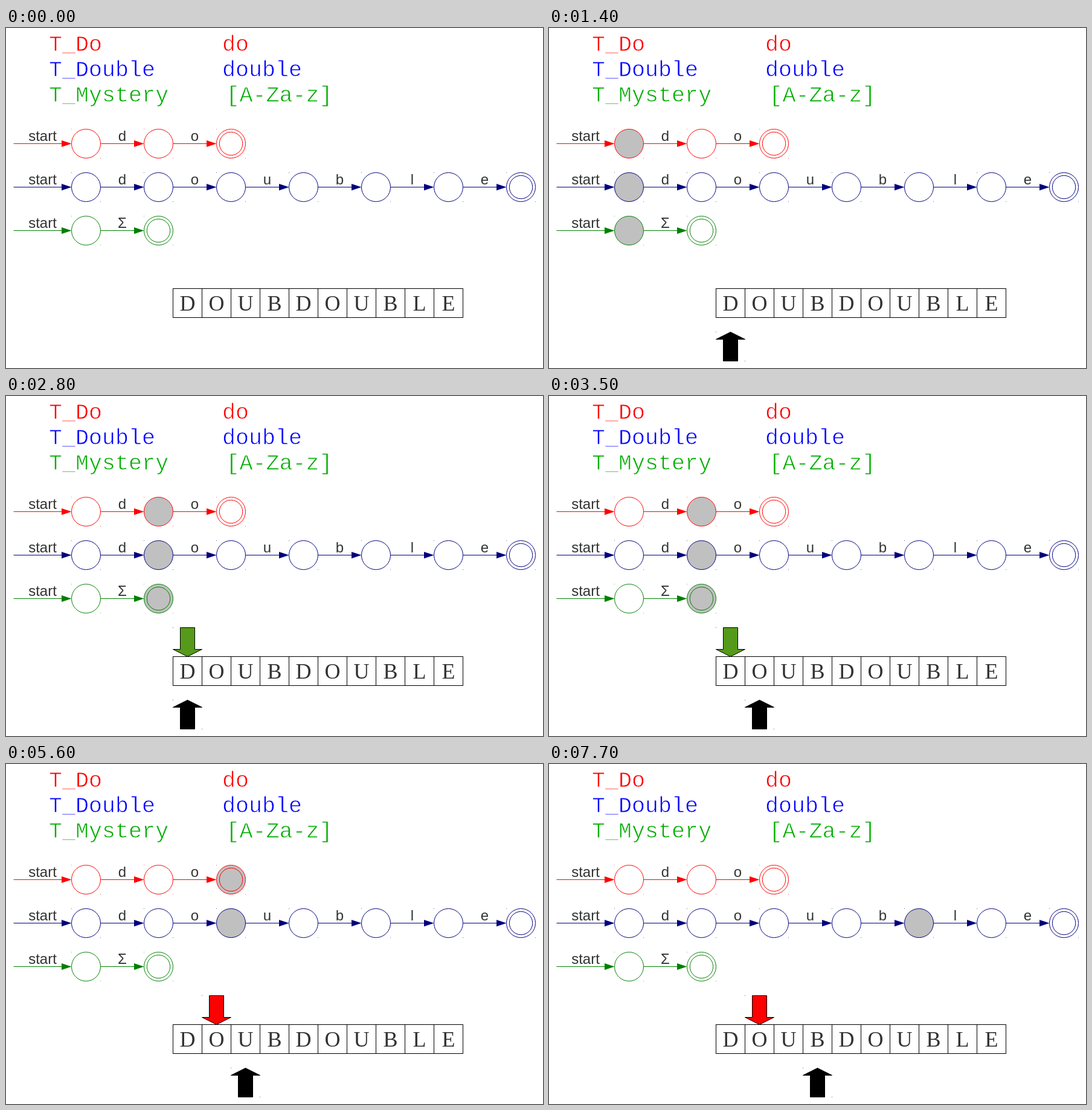
These frames come from a looping animation (889 by 563 pixels, 8 s). An HTML page:

```html
<!DOCTYPE html>
<html lang="en">
<head>
<meta charset="utf-8">
<title>Maximal munch scanning</title>
<style>
  html, body { margin: 0; width: 100%; height: 100%; overflow: hidden; background: #fff; }
  svg { display: block; width: 889px; height: 563px; }
  .rule { font: 36.7px "Courier New", "Liberation Mono", monospace; white-space: pre; stroke: #fff; stroke-width: .8px; }
  .label { font: 24px "Liberation Sans", Arial, sans-serif; fill: #333; text-anchor: middle; }
  .cell { font: 36px "Liberation Serif", "Times New Roman", serif; fill: #333; text-anchor: middle; }
  .token { fill: #c0c0c0; stroke: none; }
  .token, #head, #mark { animation: 8s step-end infinite; }
  #red { animation-name: red; }
  #blue { animation-name: blue; }
  #green { animation-name: green; }
  #head { animation-name: head; }
  #mark { animation-name: mark; }

  /* one step lasts 700 ms = 8.75% */
  @keyframes red {
    0% { opacity: 0; transform: none; }
    8.75% { opacity: 1; transform: none; }
    26.25% { opacity: 1; transform: translateX(120px); }
    52.5% { opacity: 1; transform: translateX(240px); }
    78.75%, 100% { opacity: 0; transform: none; }
  }
  @keyframes blue {
    0% { opacity: 0; transform: none; }
    8.75% { opacity: 1; transform: none; }
    26.25% { opacity: 1; transform: translateX(120px); }
    52.5% { opacity: 1; transform: translateX(240px); }
    78.75% { opacity: 1; transform: translateX(360px); }
    96.25%, 100% { opacity: 1; transform: translateX(480px); }
  }
  @keyframes green {
    0% { opacity: 0; transform: none; }
    8.75% { opacity: 1; transform: none; }
    26.25% { opacity: 1; transform: translateX(120px); }
    52.5%, 100% { opacity: 0; transform: none; }
  }
  @keyframes head {
    0% { opacity: 0; transform: none; }
    17.5% { opacity: 1; transform: none; }
    43.75% { opacity: 1; transform: translateX(48px); }
    70% { opacity: 1; transform: translateX(96px); }
    87.5%, 100% { opacity: 1; transform: translateX(144px); }
  }
  @keyframes mark {
    0% { opacity: 0; transform: none; fill: #559a1a; }
    35% { opacity: 1; transform: none; fill: #559a1a; }
    52.5% { opacity: 1; transform: none; fill: #00ae00; }
    61.25%, 100% { opacity: 1; transform: translateX(48px); fill: #f00; }
  }
</style>
</head>
<body>
<svg id="stage" viewBox="0 0 889 563" fill="none"></svg>
<script>
  const stage = document.getElementById('stage');

  function add(parent, tag, attrs, text) {
    const el = document.createElementNS('http://www.w3.org/2000/svg', tag);
    for (const key in attrs) el.setAttribute(key, attrs[key]);
    if (text) el.textContent = text;
    parent.append(el);
    return el;
  }

  // specks at the corners of a shape's 48px box
  function corners(parent, x, y, color) {
    for (const d of [0, 48])
      add(parent, 'rect', { x: x + d - .5, y: y + d - .5, width: 1, height: 1, fill: color, stroke: 'none', opacity: .6 });
  }

  function rule(name, pattern, x, y, fill) {
    add(stage, 'text', { class: 'rule', x: 71, y, fill }, name);
    add(stage, 'text', { class: 'rule', x, y, fill }, pattern);
  }

  function edge(row, from, to, y, color, label) {
    add(row, 'path', { d: `M${from} ${y}H${to - 14}` });
    add(row, 'path', { d: `M${to} ${y}l-16.5 -5.5v11z`, fill: color, stroke: 'none' });
    return add(row, 'text', { class: 'label', x: (from + to) / 2, y: y - 4.5, stroke: 'none' }, label);
  }

  function machine(id, letters, y, color) {
    const row = add(stage, 'g', { stroke: color });
    add(row, 'circle', { id, class: 'token', cx: 132.5, cy: y, r: 24 });
    edge(row, 12.5, 108.5, y, color, 'start');
    for (let i = 0; i <= letters.length; i++) {
      const cx = 132.5 + 120 * i;
      corners(row, cx - 24, y - 24, color);
      add(row, 'circle', { cx, cy: y, r: 24 });
      if (i < letters.length) edge(row, cx + 24, cx + 96, y, color, letters[i]);
      else add(row, 'circle', { cx, cy: y, r: 19.2 });
    }
  }

  rule('T_Do', 'do', 358, 38, '#f00');
  rule('T_Double', 'double', 358, 80, '#00f');
  rule('T_Mystery', '[A-Za-z]', 364.5, 122, '#00ae00');

  machine('red', 'do', 191.5, '#f00');
  machine('blue', 'double', 263.5, '#000080');
  machine('green', 'Σ', 335.5, '#008000');

  [...'DOUBDOUBLE'].forEach((letter, i) => {
    const x = 276.5 + 48 * i;
    add(stage, 'rect', { x, y: 431.5, width: 48, height: 48, stroke: '#000' });
    add(stage, 'text', { class: 'cell', x: x + 24, y: 468 }, letter);
  });

  const head = add(stage, 'g', { id: 'head', fill: '#000', stroke: '#000' });
  add(head, 'path', { d: 'M300.5 503.5l24 12h-12v36h-24v-36h-12z' });
  corners(head, 276.5, 503.5, '#000');

  const mark = add(stage, 'g', { id: 'mark', stroke: '#000' });
  add(mark, 'path', { d: 'M300.5 431.5l24 -12h-12v-36h-24v36h-12z' });
  corners(mark, 276.5, 383.5, '#000');
</script>
</body>
</html>
```
